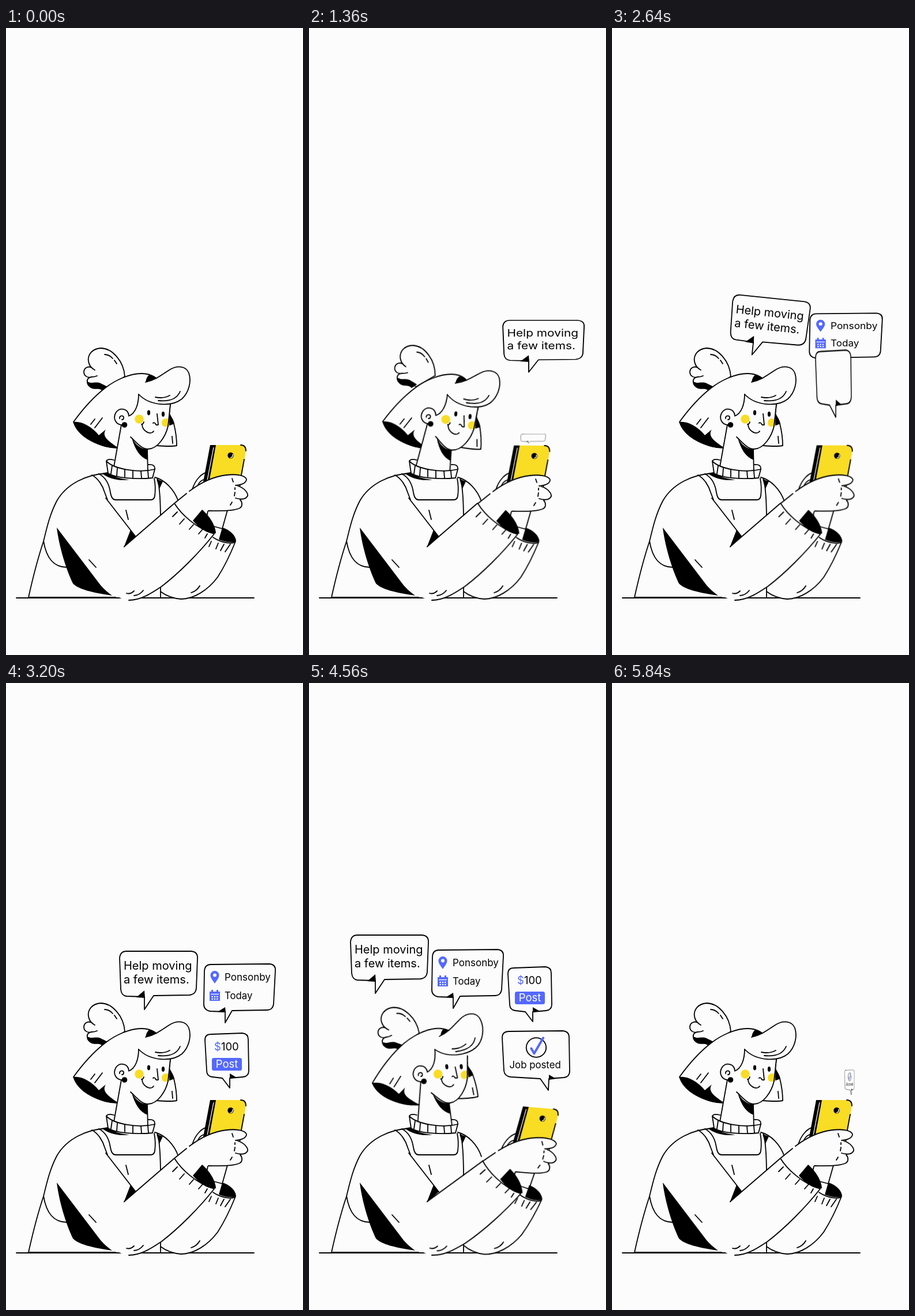
Write an HTML page that moves like this. It is 515 by 1087 pixels and loops after 5920 ms.

```html
<!DOCTYPE html>
<html lang="en">
<head>
<meta charset="utf-8">
<title>Posting a job</title>
<style>
  html, body { margin: 0; width: 100%; height: 100%; overflow: hidden; background: #fcfcfc; }
  svg { display: block; width: 100%; height: 100%; font-family: Inter, "Open Sans", sans-serif; }
  .line { fill: none; stroke: #000; stroke-width: 1.8; stroke-linecap: round; stroke-linejoin: round; }
  .skin { fill: #fcfcfc; stroke: #000; stroke-width: 1.8; stroke-linejoin: round; stroke-linecap: round; }
  .paper { fill: #fcfcfc; }
  .sun { fill: #f9dc24; }
  .blue { fill: #5468ff; }

  .head, .mane, .fringe, .arm, .hold, .upper {
    animation: 5920ms ease-in-out infinite;
  }
  .head { transform-origin: 227px 749px; animation-name: nod; }
  .mane { transform-origin: 235px 610px; animation-name: drag; }
  .fringe { transform-origin: 235px 630px; animation-name: lift; }
  .arm { transform-origin: 215px 990px; animation-name: swing; }
  .arm.far { transform-origin: 296px 990px; }
  .hold { transform-origin: 330px 830px; animation-name: tip; }
  .upper { transform-origin: 205px 899px; animation-name: stretch; }

  @keyframes nod {
    0%, 6.8% { transform: rotate(0); }
    11.8% { transform: rotate(4deg); }
    16.9%, 23% { transform: rotate(5deg); }
    26.9% { transform: rotate(-6.5deg); }
    31% { transform: rotate(1.2deg); }
    35.1% { transform: rotate(.4deg); }
    38.8%, 60.8% { transform: rotate(0); }
    65.9% { transform: rotate(-12deg); }
    68.9%, 74.3% { transform: rotate(-11deg); }
    81.1% { transform: rotate(4deg); }
    86.5%, 90.5% { transform: rotate(4.8deg); }
    93.9% { transform: rotate(-5deg); }
    96.6% { transform: rotate(1deg); }
    98.3%, 100% { transform: rotate(0); }
  }
  /* the hair trails behind the nod */
  @keyframes drag {
    0%, 6.8% { transform: rotate(0); }
    11.8%, 23% { transform: rotate(-4deg); }
    26.9% { transform: rotate(1.5deg); }
    31%, 60.8% { transform: rotate(0); }
    65.9%, 74.3% { transform: rotate(3deg); }
    81.1%, 90.5% { transform: rotate(-4deg); }
    93.9% { transform: rotate(1.5deg); }
    96.6%, 100% { transform: rotate(0); }
  }
  @keyframes lift {
    0%, 60.8% { transform: rotate(0); }
    65.9%, 74.3% { transform: rotate(-10deg); }
    81.1%, 100% { transform: rotate(0); }
  }
  @keyframes swing {
    0%, 6.8% { transform: rotate(0); }
    9.5% { transform: rotate(1deg); }
    13% { transform: rotate(-.4deg); }
    17%, 20% { transform: rotate(0); }
    23% { transform: rotate(.3deg); }
    26% { transform: rotate(-.5deg); }
    30%, 40% { transform: rotate(0); }
    43% { transform: rotate(.8deg); }
    46% { transform: rotate(-.3deg); }
    50%, 60.8% { transform: rotate(0); }
    65.9%, 74.3% { transform: rotate(4.6deg); }
    81.1%, 86.5% { transform: rotate(.5deg); }
    91%, 100% { transform: rotate(0); }
  }
  @keyframes tip {
    0%, 60.8% { transform: translate(0, 0) rotate(0); }
    65.9%, 74.3% { transform: translate(-1px, 3px) rotate(2.5deg); }
    81.1%, 100% { transform: translate(0, 0) rotate(0); }
  }
  @keyframes stretch {
    0%, 60.8% { transform: rotate(0) scale(1); }
    65.9%, 74.3% { transform: rotate(6.7deg) scale(1.04); }
    81.1%, 86.5% { transform: rotate(.6deg) scale(1); }
    91%, 100% { transform: rotate(0) scale(1); }
  }
</style>
</head>
<body>
<svg viewBox="0 0 515 1087" preserveAspectRatio="xMidYMid meet">
  <g class="head">
    <!-- lock behind the face -->
    <path class="skin" d="M262,724 C274,725 286,726 296,724 C296,711 294,698 291,686 L283,668 L262,690"/>
    <path d="M284,670 C288,675 291,681 292,686 L279,691Z"/>
    <path class="line" d="M288,708 L289,720"/>
    <!-- bun -->
    <path class="skin" d="M206,604 C204,577 184,555 164,555 C150,556 141,566 143,578 C144,584 147,588 151,591 C146,585 136,587 135,596 C135,603 141,607 148,605 C142,606 140,610 141,614 L175,626Z"/>
    <path class="line" d="M151,591 L154,593 M148,605 Q154,605 158,603 M171,566 Q179,566 185,573 M188,576 L192,582"/>
    <path d="M140,613 C146,618 158,611 166,617 C170,619 173,620 176,622 L167,629 C162,623 154,628 147,624 C142,621 140,617 140,613Z"/>
    <!-- hair -->
    <g class="mane">
      <path class="skin" d="M117,683 C130,665 150,641 172,624 C190,610 215,599 235,599 C246,599 253,602 258,606 L280,640 L215,712 L194,728 C168,728 128,712 117,683Z"/>
      <path d="M117,683 C130,681 148,690 161,706 L173,696 C167,706 172,713 195,728 C172,730 145,717 133,707 C124,699 118,691 117,683Z"/>
      <path class="line" d="M154,678 L147,687 M167,676 L154,693"/>
    </g>
    <!-- neck and face -->
    <path class="paper" d="M200,688 L184,778 L247,778 L245,728 L283,692 L284,640 L230,630 L212,672Z"/>
    <path class="line" d="M200,688 L185,772 M245,730 L246,772"/>
    <path d="M218,711 C226,724 236,731 245,730 L246,749 C232,744 224,731 218,711Z"/>
    <path class="skin" d="M285,652 L281,690 C277,708 263,730 246,730 C235,730 226,718 216,709"/>
    <path class="paper" d="M230,634 L285,650 L281,688 L218,709 L204,684 L212,672 C224,668 230,651 230,634Z"/>
    <path class="line" d="M230,635 C230,651 225,669 212,673"/>
    <circle class="sun" cx="231" cy="678" r="7.7"/>
    <path class="sun" d="M282,678 C276,675 270,679 270,684 C270,690 275,693 280,690Z"/>
    <path class="line" d="M285,652 L281,690"/>
    <ellipse cx="247.5" cy="667" rx="2.6" ry="4.4"/>
    <ellipse cx="272.5" cy="669.5" rx="2.6" ry="4.4"/>
    <path class="line" d="M262,669 L264,688 Q260,689 259,686 Q257,683 255,685 M235,687 Q238,687 239,683 M236,687 C236,698 250,707 256,699"/>
    <!-- ear -->
    <path class="skin" d="M213,672 C212,660 198,657 191,666 C184,677 191,689 203,688"/>
    <path class="line" d="M197,677 C196,671 205,671 204,676 Q204,679 201,679"/>
    <circle cx="205.5" cy="688" r="4.8"/>
    <!-- fringe -->
    <path d="M242,615 C243,606 247,601 250,601 C255,602 258,604 262,607 C253,609 248,612 242,615Z"/>
    <g class="fringe">
      <path class="paper" d="M242,614 C262,609 270,601 283,593 C297,584 312,586 317,598 C322,613 317,632 305,643 C288,657 250,656 230,635Z"/>
      <path class="line" d="M242,614 C262,609 270,601 283,593 C297,584 312,586 317,598 C322,613 317,632 305,643 C288,657 250,656 230,635 M259,640 Q273,643 284,637 M264,646 Q294,649 302,630"/>
    </g>
  </g>

  <!-- body -->
  <path class="line" d="M18,988 H430" stroke-linecap="butt"/>
  <path class="paper" d="M172,771 C140,774 105,790 88,820 C75,845 70,870 65,890 C55,920 45,960 39,987 H267 L299,821 C292,800 275,783 258,779Z"/>
  <path class="line" d="M174,772 C140,774 105,790 88,820 C75,845 70,870 65,890 C55,920 45,960 39,987 H190 M65,889 C70,920 83,935 106,935 M258,779 C275,783 292,800 299,821"/>
  <path class="line" d="M149,775 C160,781 168,794 171,805 M161,773 C173,779 179,792 181,805 Q183,818 190,818 H251 Q257,818 258,811 Q260,796 257,781 M263,782 C267,800 268,825 268,853 V987 M171,805 L176,818 M173,815 L225,882 M208,836 L212,852 M144,922 L156,935"/>
  <path d="M261,782 L272,786 L266,799Z"/>
  <path d="M88,866 L164,966 C170,973 177,979 184,984 C150,979 125,973 116,963 C105,940 92,900 88,866Z"/>
  <path d="M166,772 L176,770 C188,779 200,782 214,783 C195,786 178,781 166,772Z"/>
  <!-- collar -->
  <path class="skin" d="M174,751 C188,765 230,772 258,765 L254,780 C225,783 190,780 177,772Z"/>
  <path class="line" d="M174,751 Q176,746 187,749 M258,765 Q259,756 247,757 M184,759 L182,773 M193,763 L192,777 M206,766 V778 M220,768 V780 M234,768 L235,780 M246,768 L247,780"/>

  <!-- far sleeve, wrist, cuff lining -->
  <g class="arm far">
    <path class="paper" d="M359,883 C372,892 392,896 398,890 C390,910 378,935 367,952 C350,975 325,990 304,990 C290,989 277,984 268,977Z"/>
    <path class="line" d="M359,883 C372,892 392,896 398,890 C390,910 378,935 367,952 C350,975 325,990 304,990 C290,989 277,984 268,977 M336,967 Q331,976 321,979 M356,890 L352,899 M368,893 L364,903 M378,895 L372,906 M389,895 L380,908"/>
  </g>
  <g class="arm">
    <path class="skin" d="M384,836 L375,868 L345,860 L350,838"/>
  </g>
  <g class="arm far">
    <path d="M375,866 C389,870 398,880 399,889 C393,894 380,891 369,887Z"/>
  </g>

  <g class="arm">
    <g class="hold">
      <path class="skin" d="M323,800 C328,783 340,771 350,770 L352,800Z"/>
      <path class="line" d="M333,792 Q338,782 347,783"/>
      <path class="sun" d="M362,723 H409 Q417,723 416,732 L405,802 L348,800Z"/>
      <path d="M354,723 H364 L352,788 L341,792Z"/>
      <path d="M360,727 L349,784" stroke="#fcfcfc" stroke-width="1.3"/>
      <path class="line" d="M407,723 Q416,723 416,733 M413,748 L408,775 M406,790 L405,798"/>
      <circle cx="389.5" cy="741" r="5.2"/>
      <path d="M393,739 Q394,744 389,745" fill="none" stroke="#fcfcfc" stroke-width="1.5"/>
      <!-- near hand -->
      <path class="paper" d="M292,824 L318,803 C335,790 358,778 382,775 C398,773 414,775 417,782 C417,789 408,792 399,793 C411,793 420,805 419,811 C416,817 408,818 402,817 C410,820 411,830 404,833 C390,838 370,837 351,837 L340,835 L324,856Z"/>
      <path class="line" d="M292,824 L313,807 M318,803 C335,790 358,778 382,775 C398,773 414,775 417,782 C417,789 408,792 398,793 M402,794 C413,797 420,806 419,811 C416,817 408,818 398,815 M406,818 C410,822 411,830 404,833 C390,838 370,837 351,837 M392,781 L394,787 M397,797 V800 M397,805 L396,811 M392,822 L389,827"/>
    </g>
    <!-- near sleeve -->
    <path class="paper" d="M192,985 Q203,991 213,992 C235,992 255,978 270,968 C300,945 335,910 361,877 C330,868 303,842 292,824 L205,899Z"/>
    <path class="line" d="M213,992 C235,992 255,978 270,968 C300,945 335,910 361,877 C330,868 303,842 292,824 M297,839 L289,847 M309,851 L301,860 M325,861 L318,869 M341,869 L334,877 M349,877 L345,884 M209,980 Q216,982 222,976 M222,984 Q232,983 238,975"/>
    <path d="M324,854 L340,835 C350,843 363,860 364,876 C352,879 335,867 324,854Z"/>
  </g>
  <path class="line upper" d="M205,899 L292,824"/>
  <path d="M204,901 L216,870 L225,882Z"/>

  <g id="help">
    <path class="skin" d="M-31,-101 L81,-101 Q93,-100 92,-88 L90,-37 Q89,-26 78,-25 L16,-24 L0,0 L0,-22 L-31,-23 Q-40,-24 -41,-35 L-43,-89 Q-42,-101 -31,-101Z"/>
    <path d="M-14,-21 L0,-33 L1,-20Z"/>
    <g data-in="text" data-wait="380" data-at="-36,-69"><text font-size="20">Help moving</text></g>
    <g data-in="text" data-wait="460" data-at="-36,-45"><text font-size="20">a few items.</text></g>
  </g>
  <g id="place">
    <path class="skin" d="M-25,-101 L77,-102 Q88,-101 87,-90 L84,-33 Q83,-22 72,-22 L12,-21 L0,0 L0,-19 L-26,-20 Q-37,-22 -37,-32 L-36,-90 Q-35,-101 -25,-101Z"/>
    <path d="M-13,-19 L0,-27 L1,-18Z"/>
    <g data-in="icon" data-wait="560" data-at="-18,-79">
      <path class="blue" fill-rule="evenodd" d="M0,11 C-4,5 -7.5,1 -7.5,-3.5 A7.5,7.5 0 0 1 7.5,-3.5 C7.5,1 4,5 0,11Z M0,-6.5 A3,3 0 0 0 0,-0.5 A3,3 0 0 0 0,-6.5Z"/>
    </g>
    <g data-in="text" data-wait="520" data-at="-1,-73"><text font-size="17">Ponsonby</text></g>
    <g data-in="spin" data-wait="640" data-at="-18,-47">
      <path class="blue" d="M-9,-7 H9 V9 H-9Z M-6,-10 H-3 V-6 H-6Z M3,-10 H6 V-6 H3Z"/>
      <path d="M-7,-2.5 H7" stroke="#fcfcfc" stroke-width="1.3"/>
      <path d="M-5.5,1.8 H6 M-5.5,5.8 H6" stroke="#fcfcfc" stroke-width="2.2" stroke-dasharray="2.4 1.9"/>
    </g>
    <g data-in="text" data-wait="620" data-at="-1,-41"><text font-size="16.8">Today</text></g>
  </g>
  <g id="price">
    <path class="skin" d="M-33,-93 L22,-95 Q32,-94 32,-84 L33,-30 Q33,-20 23,-19 L0,-17 L0,0 L-13,-17 L-30,-19 Q-40,-20 -40,-30 L-43,-83 Q-43,-93 -33,-93Z"/>
    <path d="M0,-25 L12,-18 L0,-16Z"/>
    <g data-in="text" data-wait="280" data-at="-27,-65"><text font-size="18.5"><tspan class="blue">$</tspan>100</text></g>
    <g data-in="icon" data-wait="340" data-at="-5,-41">
      <rect class="blue" x="-26" y="-11" width="52" height="22" rx="3.5"/>
      <text x="0" y="6" font-size="18.5" fill="#fff" text-anchor="middle">Post</text>
    </g>
  </g>
  <g id="done">
    <path class="skin" d="M-68,-102 L25,-103 Q36,-102 36,-92 L37,-34 Q37,-23 27,-22 L1,-20 L0,0 L-14,-20 L-65,-23 Q-76,-24 -77,-34 L-80,-91 Q-80,-102 -68,-102Z"/>
    <path d="M1,-27 L13,-20 L1,-18Z"/>
    <g data-in="icon" data-wait="420" data-at="-21,-74">
      <circle r="17" class="line"/>
      <path d="M-8.5,1.5 L-3.5,10.5 L12,-17" fill="none" stroke="#5468ff" stroke-width="4" stroke-linecap="round" stroke-linejoin="round"/>
    </g>
    <g data-in="text" data-wait="500" data-at="-66,-38"><text font-size="16.8">Job posted</text></g>
  </g>
</svg>

<script>
const LOOP = 5920;

// Rows are [ms, ...values]
const POP = [[0, .1, 0, 14], [60, .35, .16, 11], [180, .85, 1.3, -30], [300, 1.12, .78, 7],
             [440, .95, 1.08, -5], [560, 1.02, .98, 0], [700, 1, 1, 0]];
const OUT = [[0, 1, 1, 0], [80, .97, .88, 0], [180, .92, 1.12, -37], [280, .71, .93, -21],
             [440, .145, .42, 8], [500, 0, 0, 12]];
const MOVE = [[0, 0], [200, 1.2], [320, .96], [480, 1.01], [640, 1]];
const SQUASH = [[0, 1], [120, 1.1], [200, 1.08], [320, .89], [480, 1.04], [640, 1]];
const LEAN = [[0, 0], [180, -5], [400, 6], [520, 5], [720, 0]];
const ICON = [[0, 0, 0], [120, .8, 1.2], [220, 1.25, .75], [360, 1, 1]];
const SPIN = [[0, 0, -30], [120, 1, 12], [240, 1, -5], [360, 1, 0]];
const TEXT = [[0, 0, -14], [160, 1, -8], [300, 1, 0]];

const enter = {
  text: t => { const [s, x] = track(TEXT, t); return `translate(${x}) scale(${s})`; },
  icon: t => `scale(${track(ICON, t)})`,
  spin: t => { const [s, turn] = track(SPIN, t); return `rotate(${turn}) scale(${s})`; }
};

// at: first tail position; moves: [start, dx, dy, sideways]
const bubbles = [
  { id: "help", pop: 400, out: 4840, at: [381, 709],
    moves: [[1040, 0, -117, 0], [2250, -141, -26, 1], [3560, -125, -28, 1]] },
  { id: "place", pop: 1300, out: 5040, at: [380, 709],
    moves: [[2250, 0, -120, 0], [3690, -130, -25, 1]] },
  { id: "price", pop: 2480, out: 5240, at: [388, 702], moves: [[3760, 0, -115, 0]] },
  { id: "done", pop: 3800, out: 5400, at: [415, 706], moves: [] }
];

for (const b of bubbles) {
  b.el = document.getElementById(b.id);
  b.parts = [...b.el.querySelectorAll("[data-in]")];
}

function track(rows, t) {
  const i = rows.findIndex(r => r[0] > t);
  if (i === 0) return rows[0].slice(1);
  if (i < 0) return rows[rows.length - 1].slice(1);
  const a = rows[i - 1], b = rows[i];
  const k = (1 - Math.cos(Math.PI * (t - a[0]) / (b[0] - a[0]))) / 2;
  return a.slice(1).map((v, j) => v + (b[j + 1] - v) * k);
}

function drawPart(el, t) {
  const { in: kind, wait, at } = el.dataset;
  const local = t - wait;
  el.style.display = local > 0 ? "" : "none";
  if (local > 0) el.setAttribute("transform", `translate(${at}) ${enter[kind](local)}`);
}

function drawBubble(b, t) {
  const shown = t > b.pop && t < b.out + 500;
  b.el.style.display = shown ? "" : "none";
  if (!shown) return;
  let [x, y] = b.at, turn = 0;
  let [sx, sy, lift] = t < b.out ? track(POP, t - b.pop) : track(OUT, t - b.out);
  for (const [start, dx, dy, sideways] of b.moves) {
    const [k] = track(MOVE, t - start);
    x += dx * k;
    y += dy * k;
    if (sideways) {
      turn += track(LEAN, t - start)[0];
    } else {
      const [s] = track(SQUASH, t - start);
      sy *= s;
      sx *= 1 + (1 - s) * .4;
    }
  }
  b.el.setAttribute("transform", `translate(${x} ${y + lift}) rotate(${turn}) scale(${sx} ${sy})`);
  b.parts.forEach(p => drawPart(p, t - b.pop));
}

let begin;
function tick(now) {
  begin ??= now;
  const t = (now - begin) % LOOP;
  bubbles.forEach(b => drawBubble(b, t));
  requestAnimationFrame(tick);
}
bubbles.forEach(b => drawBubble(b, 0));
requestAnimationFrame(tick);
</script>
</body>
</html>
```
